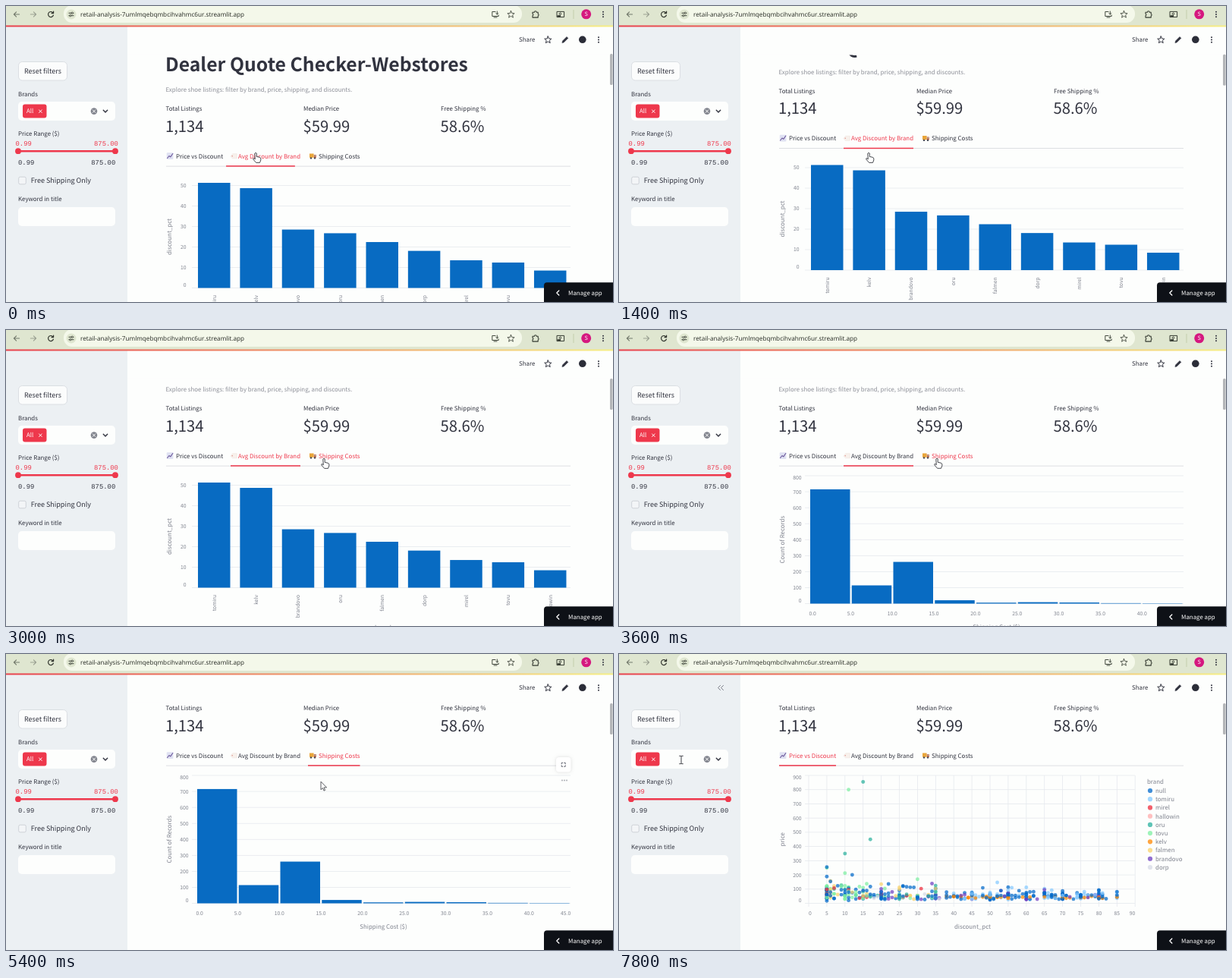
Recreate the animation shown at these times as an HTML page with a canvas. Size 800 px wide and 390 px high, loop 8 s.

```html
<!DOCTYPE html>
<html lang="en">
<head>
<meta charset="utf-8">
<title>Shoe price dashboard</title>
<style>
  html, body { margin: 0; width: 100%; height: 100%; overflow: hidden; background: #fdfefd; }
  canvas { display: block; width: 100vw; height: 100vh; }
</style>
</head>
<body>
<canvas id="stage" width="800" height="390"></canvas>
<script>
const ctx = document.getElementById('stage').getContext('2d');
ctx.textRendering = 'geometricPrecision';

const LOOP = 8000, STEP = 200, UNIT = 0.563;
const INK = '#31333f', GREY = '#7f828e', RED = '#ee384c', BLUE = '#086bc2', GRID = '#e6e9ee', PAPER = '#fdfefd';
const SANS = '"Noto Sans CJK JP", "Noto Sans CJK SC", "Noto Sans CJK", sans-serif';
const MONO = '"Liberation Mono", monospace';

// ---------- drawing helpers ----------
// y is the middle of the capitals; size is in page pixels before scaling
function text(str, x, y, { size = 14, color = INK, align = 'left', weight = 400, turned = false } = {}) {
  const px = size * UNIT;
  ctx.save();
  ctx.font = `${weight} ${px}px ${SANS}`;
  ctx.fillStyle = color;
  ctx.textAlign = align;
  ctx.translate(x, y);
  if (turned) ctx.rotate(-Math.PI / 2);
  ctx.fillText(str, 0, px * 0.366);
  ctx.restore();
}
function plainText(str, x, y, font, color) {
  ctx.font = font;
  ctx.fillStyle = color;
  ctx.textAlign = 'left';
  ctx.fillText(str, x, y);
}
function rect(x, y, w, h, color) {
  ctx.fillStyle = color;
  ctx.fillRect(x, y, w, h);
}
function box(x, y, w, h, r, fill, border) {
  ctx.beginPath();
  ctx.roundRect(x, y, w, h, r);
  ctx.fillStyle = fill;
  ctx.fill();
  if (border) { ctx.strokeStyle = border; ctx.lineWidth = 0.8; ctx.stroke(); }
}
function dot(x, y, r, color) {
  ctx.beginPath();
  ctx.arc(x, y, r, 0, 7);
  ctx.fillStyle = color;
  ctx.fill();
}
function path(d, x, y, stroke, width = 1, fill) {
  const shape = Reflect.construct(Path2D, [d]);
  ctx.save();
  ctx.translate(x, y);
  if (fill) { ctx.fillStyle = fill; ctx.fill(shape); }
  if (stroke) {
    ctx.strokeStyle = stroke;
    ctx.lineWidth = width;
    ctx.lineCap = ctx.lineJoin = 'round';
    ctx.stroke(shape);
  }
  ctx.restore();
}
const STAR = 'M0-4.6L1.3-1.5 4.6-1.3 2.1.9 2.9 4.2 0 2.4-2.9 4.2-2.1.9-4.6-1.3-1.3-1.5Z';
const CROSS = 'M-1.8-1.8L1.8 1.8M1.8-1.8L-1.8 1.8';
const kebab = (x, y) => [-3.2, 0, 3.2].forEach(d => dot(x, y + d, 1, INK));

// ---------- motion ----------
function along(keys, t) {
  const i = keys.findIndex(k => k[0] > t);
  if (i === 0) return keys[0].slice(1);
  if (i < 0) return keys.at(-1).slice(1);
  const a = keys[i - 1], b = keys[i], p = (t - a[0]) / (b[0] - a[0]);
  return a.slice(1).map((v, j) => v + (b[j + 1] - v) * p);
}
const SCROLL = [[1000, 0], [1400, 23.5], [1600, 31], [1800, 32], [4000, 32], [4200, 36], [4600, 60], [4800, 64]];
const POINTER = [[1800, 325, 193], [2800, 415, 169], [5600, 415, 168.5], [6400, 241, 137], [7000, 241, 137], [7600, 82, 139.5]];
// time, tab before, tab after
const CLICKS = [[-147, 0, 1], [3600, 1, 2], [6900, 2, 0]];

// ---------- charts (y measured before scrolling) ----------
const BRANDS = ['tomiru', 'kelv', 'brandovo', 'oru', 'falmen', 'dorp', 'mirel', 'tovu', 'hallowin'];
const DISCOUNTS = [51.3, 48.7, 28.5, 26.7, 22.4, 18.1, 13.5, 12.4, 8.5];
const COUNTS = [715, 114, 261, 21, 6, 9, 7, 3, 2];
const axisLabel = { size: 12, color: GREY };

function yAxis(title, max, step, top, bottom, right) {
  for (let v = 0; v <= max; v += step) {
    const y = bottom - v / max * (bottom - top);
    const flush = v === 0 ? -4 : v === max && max > 50 ? 2.3 : 0;
    rect(245, y - 0.4, right - 245, 0.8, GRID);
    text(v, 240.5 - (max <= 50 ? 3 : 0), y + flush, { ...axisLabel, align: 'right' });
  }
  text(title, 215, (top + bottom) / 2, { color: GREY, align: 'center', turned: true });
}
function brandChart() {
  yAxis('discount_pct', 50, 10, 236.5, 371.5, 744);
  DISCOUNTS.forEach((v, i) => {
    const x = 253 + i * 55.37;
    rect(x, 371.5 - v * 2.7, 42.5, v * 2.7, BLUE);
    text(BRANDS[i], x + 21.2, 381, { ...axisLabel, align: 'right', turned: true });
  });
  text('brand', 497, 424, { color: GREY, align: 'center' });
}
function shippingChart() {
  yAxis('Count of Records', 800, 100, 224, 392.5, 744);
  COUNTS.forEach((v, i) => rect(252 + i * 54.75, 392.5 - v * 0.2106, 52.5, v * 0.2106, BLUE));
  for (let i = 0; i <= 9; i++) {
    const align = i === 0 ? 'left' : i === 9 ? 'right' : 'center';
    text((i * 5).toFixed(1), 250.5 + i * 54.85, 406, { ...axisLabel, align });
  }
  text('Shipping Cost ($)', 497.5, 423.5, { color: GREY, align: 'center' });
}

const LEGEND = [['null', '#0068c9'], ['tomiru', '#83c9ff'], ['mirel', '#ee2b3b'], ['hallowin', '#ffabab'], ['oru', '#29b09d'],
  ['tovu', '#7defa1'], ['kelv', '#ff8700'], ['falmen', '#f8d16a'], ['brandovo', '#6d3fc0'], ['dorp', '#d5dae5']];
// indexes into LEGEND, repeated by how often they occur
const MIX = { low: [0, 0, 0, 0, 0, 5, 5, 5, 2, 7], mid: [0, 0, 0, 0, 0, 0, 5, 5, 4, 7, 2, 8, 9], high: [0, 0, 0, 0, 0, 0, 1, 1, 6, 6, 8] };

function makeListings() {
  let seed = 11;
  const random = () => (seed = (seed * 48271) % 2147483647) / 2147483647;
  const list = [[15, 855, 4], [11, 800, 5], [17, 450, 4], [10, 350, 4], [5, 250, 5], [5, 255, 0], [12, 200, 0],
    [30, 170, 5], [52, 147, 1], [56, 110, 1], [60, 112, 1], [67, 92, 1], [20, 135, 7]];
  for (let i = 0; i < 440; i++) {
    const low = i < 65;
    const d = low ? 5 + Math.floor(random() ** 2 * 7)
      : random() < 0.35 ? 5 * (2 + Math.floor(random() * 16)) : 10 + Math.floor(random() * 73);
    const group = d < 12 ? 'low' : d < 38 ? 'mid' : 'high';
    const kind = MIX[group][Math.floor(random() * MIX[group].length)];
    let price = 25 + 35 * random() + (group === 'mid' ? 90 : 55) * random() ** 4;
    if (group === 'low') price = 15 + 110 * random() + 90 * random() ** 4;
    if (kind === 6) price = 35 + 15 * random();
    list.push([d, price, kind]);
  }
  return list;
}
const LISTINGS = makeListings();

function priceChart() {
  yAxis('price', 900, 100, 224, 392.5, 680);
  for (let v = 0; v <= 90; v += 5) {
    const x = 250 + v * 4.78;
    rect(x - 0.4, 224, 0.8, 173, GRID);
    text(v, x, 406, { ...axisLabel, align: v === 0 ? 'left' : v === 90 ? 'right' : 'center' });
  }
  text('discount_pct', 466, 423.5, { color: GREY, align: 'center' });
  ctx.globalAlpha = 0.72;
  for (const [d, price, kind] of LISTINGS) dot(250 + d * 4.78, 392.5 - price * 0.1872, 2.45, LEGEND[kind][1]);
  ctx.globalAlpha = 1;
  text('brand', 696, 232, { color: GREY });
  LEGEND.forEach(([name, color], i) => {
    ctx.globalAlpha = 0.75;
    dot(700, 244 + i * 11.22, 3.1, color);
    ctx.globalAlpha = 1;
    text(name, 707, 244 + i * 11.22, { color: GREY });
  });
}
const CHARTS = [priceChart, brandChart, shippingChart];

// ---------- page ----------
const TABS = [['Price vs Discount', 211, 286, 224], ['Avg Discount by Brand', 296, 388, 306], ['Shipping Costs', 398, 466.5, 412]];

function tabIcons() {
  box(211.8, 193.3, 8.6, 8.6, 1, '#dfe1f2');
  path('M0 6L2.4 3 4.2 4.4 7.2 0', 212.6, 194.5, '#6d5a9c', 1.1);
  path('M0 3L2.5 0H8V6H2.5Z', 296.2, 194.8, '#eee3dd', 0.6, '#f8f1ec');
  dot(298.2, 197.8, 0.7, '#d9877f');
  rect(400, 194.5, 5.6, 5.3, '#e9a63b');
  rect(405.8, 196, 3, 3.8, '#c9623c');
  rect(406.6, 196.6, 1.7, 1.4, '#9fc6dc');
  dot(402, 200.4, 1.2, '#474650');
  dot(407, 200.4, 1.2, '#474650');
}
function content(t, scroll, hovered, chartHover) {
  ctx.save();
  ctx.translate(0, -scroll);
  text('Dealer Quote Checker-Webstores', 210, 77.3, { size: 44, weight: 700 });
  text('Explore shoe listings: filter by brand, price, shipping, and discounts.', 210.5, 110.5, { color: '#8d8f98' });
  [['Total Listings', '1,134', 210.5], ['Median Price', '$59.99', 392], ['Free Shipping %', '58.6%', 573]].forEach(([label, value, x]) => {
    text(label, x, 135.3);
    text(value, x - 0.5, 158.5, { size: 36 });
  });

  const [at, from, to] = CLICKS.findLast(c => c[0] <= t);
  const slide = 1 - (1 - Math.min(1, (t - at) / 250)) ** 3;
  const edge = i => TABS[from][i] + (TABS[to][i] - TABS[from][i]) * slide;
  tabIcons();
  TABS.forEach(([label, , , x], i) => text(label, x, 197.7, { color: i === to || i === hovered ? RED : INK }));
  rect(211, 210.7, 533, 0.8, '#d6d8dc');
  rect(edge(1), 210.2, edge(2) - edge(1), 1.5, RED);
  CHARTS[to]();

  if (chartHover) {
    ctx.save();
    ctx.shadowColor = '#0002';
    ctx.shadowBlur = 4;
    box(725, 200, 19.5, 19.5, 4, '#fff');
    ctx.restore();
    path('M-2.5-1V-2.5H-1M1-2.5H2.5V-1M2.5 1V2.5H1M-1 2.5H-2.5V1', 734.7, 209.8, '#60636e', 1);
    [-3, 0, 3].forEach(d => dot(736 + d, 230.5, 1.1, '#b4b6bc'));
  }
  ctx.restore();
}

function pageHeader(scroll) {
  rect(160, 27, 640, 37.5, PAPER);
  text('Share', 676, 44.3);
  path(STAR, 714.3, 44.5, INK, 1);
  path('M-4 4L-3.5 1.8 2-3.7 3.8-1.9-1.8 3.6Z', 737, 44.3, INK, 0.6, INK);
  dot(759.8, 44.3, 4.8, '#2b2d38');
  kebab(781, 44.5);
  box(796, 63 + scroll * 0.03, 3.6, 41, 1.5, '#b4b6b9');
}

function sidebar(collapsible) {
  rect(0, 27, 160, 363, '#ecf0f3');
  if (collapsible) path('M-1-3L-4 0-1 3M3-3L0 0 3 3', 134.5, 44.5, '#777a85', 1);
  box(16.5, 73.5, 64, 24.5, 5, '#fbfcfc', '#d5d8dd');
  text('Reset filters', 24, 86, { size: 16 });
  text('Brands', 16, 115.7);
  box(16, 126, 128, 25, 5, PAPER);
  box(22, 129.5, 31.5, 18, 3, RED);
  text('All', 27, 138.6, { color: '#fff' });
  path(CROSS, 45.4, 138.7, '#fff', 1);
  dot(116, 138.6, 4.3, '#82858e');
  path(CROSS, 116, 138.6, '#fff', 1);
  path('M-2.7-1.4L0 1.4 2.7-1.4', 131, 138.6, INK, 1.4);

  text('Price Range ($)', 16, 168);
  const mono = `8.87px ${MONO}`;
  plainText('0.99', 12.5, 184, mono, RED);
  plainText('875.00', 116, 184, mono, RED);
  rect(16, 190, 128, 2.5, RED);
  dot(16, 191.2, 3.9, RED);
  dot(144, 191.2, 3.9, RED);
  plainText('0.99', 16, 208.5, mono, INK);
  plainText('875.00', 112.3, 208.5, mono, INK);

  box(16.7, 225.2, 9.6, 9.6, 2, '#f3f5f7', '#c6cad0');
  text('Free Shipping Only', 32.8, 230.2, { size: 16 });
  text('Keyword in title', 16, 254.6);
  box(16, 265, 128, 25, 5, PAPER);
}

function browserBar() {
  rect(0, 0, 800, 26, '#dfe6d0');
  box(76, -1, 604, 23, 11, '#f4f8ea');
  path('M3.6 0H-3.6M-.4-3.2L-3.6 0-.4 3.2', 14, 11, '#737a6c', 1.1);
  path('M-3.6 0H3.6M.4-3.2L3.6 0 .4 3.2', 36, 11, '#9ba192', 1.1);
  path('M3.2-1.6A3.5 3.5 0 1 0 3.4 1.2M3.6-4V-1.4H1', 59, 11, '#30342d', 1.2);
  dot(86, 11, 6.5, '#dfe6d0');
  path('M-3-1.7H0M2.4-1.7H3M-3 1.7H-2.4M0 1.7H3', 86, 11, '#3e433a', 1);
  path('M0-1.7a1.2 1.2 0 1 0 2.4 0a1.2 1.2 0 1 0-2.4 0M-2.4 1.7a1.2 1.2 0 1 0 2.4 0a1.2 1.2 0 1 0-2.4 0', 86, 11, '#3e433a', 0.8);
  plainText('retail-analysis-7umlmqebqmbcihvahmc6ur.streamlit.app', 98, 14, '8.2px "Open Sans", "Noto Sans", sans-serif', '#252923');
  path('M0-3.5H-4.2V2.5H4.2V1M-2 4H2M2.3-4V0M.7-1.5L2.3 0 3.9-1.5', 645, 11, '#444a40', 1);
  path(STAR, 665.5, 11, '#444a40', 0.9);
  path('M-4-2.6H-1.6A1.4 1.4 0 0 1 1.2-2.6H3.2V-.4A1.4 1.4 0 0 1 3.2 2.2V4.3H-4V2A1.4 1.4 0 0 0-4-.6Z', 698, 10.8, '#343a31', 1.1);
  path('M-4.6-3.6H4.6V3.6H-4.6ZM-1.8-.6A1.3 1.3 0 1 0-1.8-.7', 731, 11, '#343a31', 1);
  rect(726.5, 12.2, 4.5, 2, '#343a31');
  rect(747.5, 5, 1, 12, '#c3ceac');
  dot(764.7, 10.8, 6.5, '#d5187f');
  text('S', 764.7, 10.8, { size: 13, color: '#fff', align: 'center' });
  kebab(787, 11);
  const strip = ctx.createLinearGradient(0, 0, 800, 0);
  strip.addColorStop(0, '#e8434e');
  strip.addColorStop(1, '#f5ee86');
  rect(0, 25.5, 800, 2, strip);
}

function manageButton() {
  box(709, 364.3, 95, 30, 4, '#0e1117');
  path('M1.5-3L-1.5 0 1.5 3', 727.3, 378, '#fff', 1.3);
  text('Manage app', 741, 378.2, { color: '#fff' });
}

function pointer(kind, x, y) {
  if (kind === 'beam') {
    const d = 'M-2.3-5.2H-.7L0-4.6 .7-5.2H2.3M0-4.6V4.6M-2.3 5.2H-.7L0 4.6 .7 5.2H2.3';
    path(d, x, y, '#2a2c33', 0.9);
  } else if (kind === 'hand') {
    path('M3 1q1.1-1.4 2.2 0V5.4l4 .9q1.6.4 1.6 2V10l-1.3 3.4H4.6L.8 9q-.4-1.7 1-1.4L3 8.6Z', x, y, '#34363d', 0.9, '#fff');
  } else {
    path('M0 0V10.2L2.4 8 4 11.6 5.6 10.9 4 7.4H7.2Z', x, y, '#34363d', 0.8, '#fff');
  }
}

function draw(t) {
  const [scroll] = along(SCROLL, t);
  const [x, y] = along(POINTER, t);
  const hovered = Math.abs(y - 197.5 + scroll) < 12 ? TABS.findIndex(tab => x >= tab[1] && x <= tab[2]) : -1;
  const inSidebar = x < 160;
  const chartHover = x > 210 && x < 744 && y > 226 - scroll;
  // the hand lingers until scrolling has settled
  const kind = x < 144 ? 'beam' : hovered >= 0 || t < 1800 ? 'hand' : 'arrow';

  rect(0, 0, 800, 390, PAPER);
  content(t, scroll, hovered, chartHover);
  pageHeader(scroll);
  sidebar(inSidebar);
  browserBar();
  manageButton();
  pointer(kind, x, y);
}

function tick() {
  const t = performance.now() % LOOP;
  draw(Math.floor(t / STEP) * STEP);
  requestAnimationFrame(tick);
}
tick();
</script>
</body>
</html>
```
